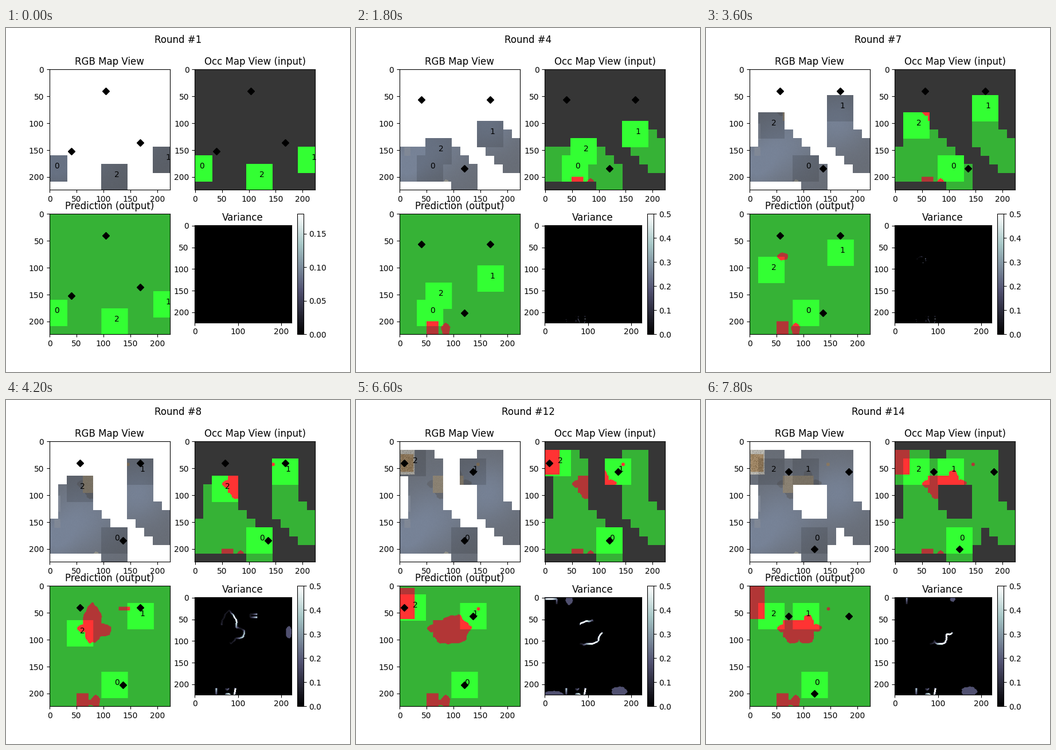
Recreate the animation shown at these times as a matplotlib script. Size 600 by 600 pixels, loop 8000 ms.

```python
import numpy as np
import matplotlib.pyplot as plt
from matplotlib.animation import FuncAnimation

SIZE, CELL, HALF = 224, 16, 24
ROUNDS, HOLD, FRAMES = 14, 3, 40

Y, X = np.mgrid[0:SIZE, 0:SIZE]
NOISE = np.random.default_rng(4).random((SIZE, SIZE))

UNKNOWN, FREE, BLOCKED = (54, 54, 54), (54, 178, 54), (178, 54, 54)
FREE_LIT, BLOCKED_LIT = (51, 255, 51), (255, 51, 51)

# Robot starts and their steps as keypad directions
STARTS = [(8, 184), (216, 168), (120, 200)]
STEPS = ["9366666555591", "7778888491471", "7777789797426"]

# Goals, each set valid from the given round on
GOALS = {
    1: [(104, 40), (168, 136), (40, 152)],
    2: [(40, 56), (168, 56), (120, 184)],
    6: [(40, 56), (168, 40), (120, 184)],
    7: [(56, 40), (168, 40), (136, 184)],
    9: [(56, 40), (168, 40), (120, 184)],
    11: [(8, 40), (136, 56), (120, 184)],
    13: [(72, 56), (184, 56), (120, 200)],
}

# Uncertain spots near the walls: first round, last round, centre, radii
SPOTS = [
    (8, 10, 216, 80, 7, 14),
    (10, 12, 56, 5, 8, 12),
    (10, 10, 57, 218, 6, 7),
    (10, 14, 171, 216, 18, 11),
    (11, 12, 20, 222, 22, 7),
    (13, 14, 133, 3, 6, 7),
]


def walk(start, steps):
    pts = [start]
    for key in steps:
        col, row = (int(key) - 1) % 3 - 1, 1 - (int(key) - 1) // 3
        x, y = pts[-1]
        pts.append((x + col * CELL, y + row * CELL))
    return pts


def rect(x0, y0, x1, y1):
    return (X >= x0) & (X < x1) & (Y >= y0) & (Y < y1)


def blob(cx, cy, rx, ry):
    """Ellipse with a slightly uneven rim."""
    dx, dy = (X - cx) / rx, (Y - cy) / ry
    angle = np.arctan2(dy, dx)
    rim = 1 + 0.05 * np.sin(5 * angle + cx) + 0.03 * np.sin(11 * angle)
    return np.hypot(dx, dy) <= rim


def outline(mask):
    p = np.pad(mask, 1, mode="edge")
    near = [p[:-2, 1:-1], p[2:, 1:-1], p[1:-1, :-2], p[1:-1, 2:]]
    return np.any([mask != q for q in near], axis=0)


def glow(x, y, s):
    return np.exp(-((X - x) ** 2 + (Y - y) ** 2) / (2 * s * s))


# Obstacles
TOP = rect(62, 64, 119, 96)
LEFT_CHAIR = blob(61, 79, 10, 7)
CHAIRS = (LEFT_CHAIR | blob(79, 96, 13, 11) | blob(104, 96, 15, 11)
          | blob(122, 78, 11, 7) | blob(108, 62, 8, 9))
TABLE = TOP | CHAIRS
BED = rect(0, 0, 28, 62)
STOOL = np.hypot(X - 145.5, Y - 42.5) <= 3.5
SHELF = rect(50, 200, 72, SIZE)
SEAT = blob(85, 214, 8, 11)
TRUTH = TABLE | BED | STOOL | SHELF | SEAT


def floor():
    light = glow(55, 145, 45) + glow(165, 95, 40) + 0.8 * glow(5, 185, 28)
    light = np.clip(light, 0, 1.1)[..., None]
    img = np.array([104, 109, 118]) + light * np.array([14, 20, 30])
    reflections = rect(16, 101, 20, 131) | rect(9, 145, 20, 161)
    for mask, rgb in [
        (CHAIRS, (100, 104, 112)),
        (TOP, (139, 130, 115)),
        (BED, (182, 180, 173)),
        (rect(2, 24, 26, 57), (156, 131, 98)),
        (STOOL, (136, 120, 98)),
        (reflections, (129, 137, 151)),
        (blob(86, 210, 5, 5), (146, 146, 138)),
    ]:
        img[mask] = rgb
    grain = np.where(BED, 56, np.where(TOP, 12, 3))
    return img + ((NOISE - 0.5) * grain)[..., None]


def guess_table(n):
    if n < 7:
        return np.zeros((SIZE, SIZE), bool)
    if n == 7:
        return LEFT_CHAIR
    if n < 10:
        return LEFT_CHAIR | blob(79, 70, 17, 37) | blob(98, 82, 16, 12)
    if n == 10:
        strip = rect(62, 74, 132, 87)
        return LEFT_CHAIR | TOP & (X < 84) | strip | blob(81, 94, 16, 13)
    if n < 13:
        return TABLE | blob(98, 82, 30, 26)
    return TABLE


def prediction(n):
    mask = guess_table(n)
    if n >= 4:
        mask = mask | SHELF | SEAT
    if n >= 8:
        mask = mask | rect(72, 212, 80, 222)
    if n == 8:
        mask = mask | rect(128, 39, 149, 46)
    if n >= 9:
        mask = mask | STOOL
    if n in (9, 10):
        mask = mask | blob(-2, 58, 30, 47) & (Y < 62)
    if n >= 11:
        mask = mask | BED & (Y >= 4 * (n < 13))
    return mask


def variance(n, guess, seen):
    """High along guessed outlines that no robot has looked at yet."""
    var = np.zeros((SIZE, SIZE))
    for first, last, *shape in SPOTS:
        if first <= n <= last:
            var[blob(*shape)] = 0.18
    rim = outline(guess) & ~seen
    if n < 8:
        rim &= NOISE < 0.15
    else:
        rim |= outline(rim) & ~seen
    var[rim] = (0.3 + 0.25 * np.sin(X / 9 + Y / 13))[rim]
    return var


def footprint(x, y):
    return rect(x - HALF, y - HALF, x + HALF + 1, y + HALF + 1)


def paint(red, lit, known):
    img = np.empty((SIZE, SIZE, 3), np.uint8)
    img[:] = FREE
    img[red] = BLOCKED
    img[lit] = FREE_LIT
    img[lit & red] = BLOCKED_LIT
    img[~known] = UNKNOWN
    return img


def build():
    ground = floor()
    paths = [walk(s, k) for s, k in zip(STARTS, STEPS)]
    seen = np.zeros((SIZE, SIZE), bool)
    everywhere = np.ones_like(seen)
    scenes = []
    for n in range(1, ROUNDS + 1):
        spots = [p[n - 1] for p in paths]
        lit = np.any([footprint(*s) for s in spots], axis=0)
        seen = seen | lit
        guess = prediction(n)
        rgb = np.where(lit[..., None], ground * 0.87, ground)
        rgb = np.where(seen[..., None], rgb, 255).clip(0, 255).astype(np.uint8)
        scenes.append(dict(
            maps=[rgb, paint(TRUTH, lit, seen), paint(guess, lit, everywhere)],
            var=variance(n, guess, seen),
            spots=spots,
            goals=GOALS[max(k for k in GOALS if k <= n)],
        ))
    return scenes


SCENES = build()

fig, axes = plt.subplots(2, 2, figsize=(6, 6), dpi=100)
heading = fig.suptitle("Round #1")
images, markers, labels = [], [], []
for ax, title in zip(axes.flat, ["RGB Map View", "Occ Map View (input)", "Prediction (output)"]):
    ax.set_title(title)
    images.append(ax.imshow(np.zeros((SIZE, SIZE, 3), np.uint8)))
    markers.append(ax.plot([], [], "kD", ms=6)[0])
    labels.append([ax.text(0, 0, str(i)) for i in range(3)])
    ax.set(xlim=(-0.5, SIZE - 0.5), ylim=(SIZE - 0.5, -0.5))

var_ax = axes[1, 1]
var_ax.set_title("Variance")
var_img = var_ax.imshow(np.zeros((SIZE, SIZE)), cmap="bone", vmin=0, vmax=0.18)
fig.colorbar(var_img, ax=var_ax)


def update(i):
    n = i // HOLD
    scene = SCENES[n]
    heading.set_text(f"Round #{n + 1}")
    for img, data, marker, texts in zip(images, scene["maps"], markers, labels):
        img.set_data(data)
        marker.set_data(*zip(*scene["goals"]))
        for text, spot in zip(texts, scene["spots"]):
            text.set_position(spot)
    var_img.set_data(scene["var"])
    var_img.set_clim(0, 0.18 if n == 0 else 0.5)
    return []


anim = FuncAnimation(fig, update, frames=FRAMES, interval=200, repeat=True, repeat_delay=0)
plt.show()
```
